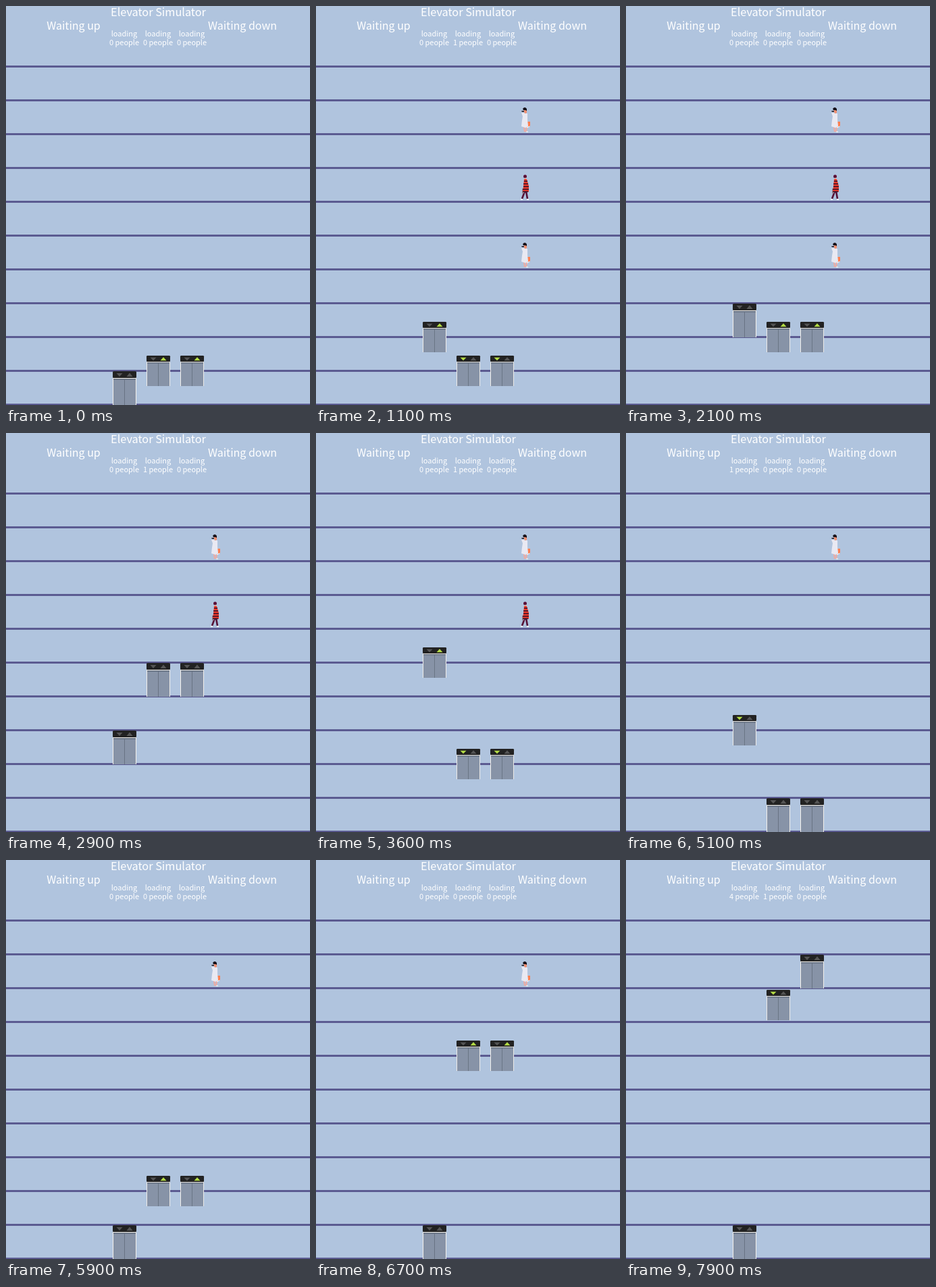
These frames come from a looping animation (450x590 px, 8000 ms). An HTML page:

```html
<!DOCTYPE html>
<html lang="en">
<head>
<meta charset="utf-8">
<title>Elevator Simulator</title>
<style>
  html, body { margin: 0; width: 100%; height: 100%; overflow: hidden; background: #b0c4de; }
  svg { display: block; width: 450px; height: 590px; }
  text { font: 16px "Noto Sans CJK SC", "Noto Sans CJK JP", "Noto Sans CJK", sans-serif; fill: #fff; text-anchor: middle; }
  .title { font-size: 16.3px; }
  .small { font-size: 11px; }
</style>
</head>
<body>
<svg viewBox="0 0 450 590">
  <defs>
    <g id="dress">
      <path d="M8 39l1 7M12 39l-1 7" stroke="#f0aaa0" stroke-width="2"/>
      <path d="M13 31l4 0 0 6-3 2z" fill="#ff7f50"/>
      <path d="M12 40l4 -2M11 46l3 0" stroke="#fff"/>
      <path d="M8 18l5 1 0 9 1 10-4 2-6-2 1-9 1-6-2-5z" fill="#e9e9f2"/>
      <path d="M7 12h5v6l-3 1z" fill="#f58f70"/>
      <path d="M6 12q3-4 6 0v3l-2-1-3 0zM4 15h4v1.5h-3z" fill="#151018"/>
    </g>
    <g id="stripes">
      <path d="M9 34l-4 11M11 34l2 11" stroke="#561238" stroke-width="2.6"/>
      <path d="M3 46l3 0M12 46l3 0" stroke="#fff" stroke-width="1.5"/>
      <path d="M5 30h3v7h-3z" fill="#9a8790"/>
      <path d="M8 16h4l3 10 0 9-9 0 1-9z" fill="#ee3b2c"/>
      <path d="M8 19h5M7 23h7M7 27h8M6 31h9M6 34.500h8" stroke="#30102a" stroke-width="1.5"/>
      <circle cx="9.500" cy="12" r="2.500" fill="#5a1038"/>
      <path d="M9 14h2v2h-2z" fill="#e89a88"/>
    </g>
    <g id="cabin">
      <path d="M0 10h35v40h-35z" fill="#8793a7"/>
      <path d="M.5 50V10.500h34V50" fill="none" stroke="#f3f0eb"/>
      <path d="M1 12h33" stroke="#535c6b"/>
      <path d="M17.500 12v38" stroke="#687383"/>
      <rect width="35" height="10" rx="1.500" fill="#222"/>
    </g>
  </defs>
  <g id="scene"></g>
</svg>
<script>
const scene = document.getElementById('scene');
const LOOP = 8000, TICK = 100, SPEED = 25;

function add(parent, tag, attrs, content = '') {
  const node = document.createElementNS('http://www.w3.org/2000/svg', tag);
  for (const name in attrs) node.setAttribute(name, attrs[name]);
  node.textContent = content;
  return parent.appendChild(node);
}
const label = (x, y, content, cls = '') => add(scene, 'text', { x, y, class: cls }, content);

for (let y = 88; y < 590; y += 50) add(scene, 'rect', { y, width: 450, height: 3, fill: '#5b5b91' });
label(225.5, 15, 'Elevator Simulator', 'title');
label(100, 35, 'Waiting up');
label(350, 35, 'Waiting down');

// Trips: [first tick, from y, to y]. Loads: [tick, people on board].
const shared = [[0, 540, 440], [9, 440, 540], [19, 540, 340], [32, 340, 540], [45, 540, 540], [57, 540, 140]];
const lifts = [
  { x: 158, trips: [[9, 540, 440], [32, 440, 240], [45, 240, 540], [77, 540, 540]], loads: [[41, 1], [58, 0], [78, 4]] },
  { x: 208, trips: [...shared, [78, 140, 540]], loads: [[5, 1], [14, 0], [28, 1], [41, 0], [74, 1]] },
  { x: 258, trips: shared, loads: [] }
];

for (const lift of lifts) {
  label(lift.x + 17, 45, 'loading', 'small');
  lift.text = label(lift.x + 17, 58, '', 'small');
  lift.node = add(scene, 'g', {});
  add(lift.node, 'use', { href: '#cabin' });
  lift.gap = add(lift.node, 'rect', { y: 13, height: 37, fill: '#626c7b' });
  lift.down = add(lift.node, 'path', { d: 'M5.500 3h9l-4.500 5z' });
  lift.up = add(lift.node, 'path', { d: 'M20.500 8h9l-4.500 -5.500z' });
}

// Passengers: visible from one tick until another.
const people = [
  ['dress', 300, 140, 1, 74], ['stripes', 300, 240, 1, 41],
  ['dress', 300, 340, 1, 28], ['stripes', 300, 440, 1, 5],
  ...[0, 1, 2, 3].map(i => [i % 2 ? 'dress' : 'stripes', 130 - 15 * i, 540, 76, 78])
].map(([look, x, y, from, until]) => ({ from, until, node: add(scene, 'use', { href: '#' + look, x, y }) }));

const latest = (list, tick) => list.filter(entry => entry[0] <= tick).pop();

function liftState(trips, tick) {
  const trip = latest(trips, tick);
  if (!trip) return { y: 540, dir: 0, gap: 0 };
  const [start, from, to] = trip;
  const moved = tick - start + 1, total = Math.abs(to - from) / SPEED;
  if (moved <= total) {
    const dir = Math.sign(to - from);
    return { y: from + dir * SPEED * moved, dir, gap: 0 };
  }
  return { y: to, dir: 0, gap: [14, 29][moved - total - 1] || 0 };
}

function draw() {
  const tick = Math.floor(performance.now() % LOOP / TICK);
  for (const lift of lifts) {
    const { y, dir, gap } = liftState(lift.trips, tick);
    const place = dir ? `translate(${lift.x} ${y + 2}) scale(1 .9)` : `translate(${lift.x} ${y})`;
    lift.node.setAttribute('transform', place);
    lift.gap.setAttribute('x', 17.5 - gap / 2);
    lift.gap.setAttribute('width', gap);
    lift.up.setAttribute('fill', dir < 0 ? '#b4dc45' : '#555');
    lift.down.setAttribute('fill', dir > 0 ? '#b4dc45' : '#555');
    const load = latest(lift.loads, tick);
    lift.text.textContent = `${load ? load[1] : 0} people`;
  }
  for (const p of people)
    p.node.setAttribute('visibility', tick >= p.from && tick < p.until ? 'visible' : 'hidden');
  requestAnimationFrame(draw);
}
draw();
</script>
</body>
</html>
```
